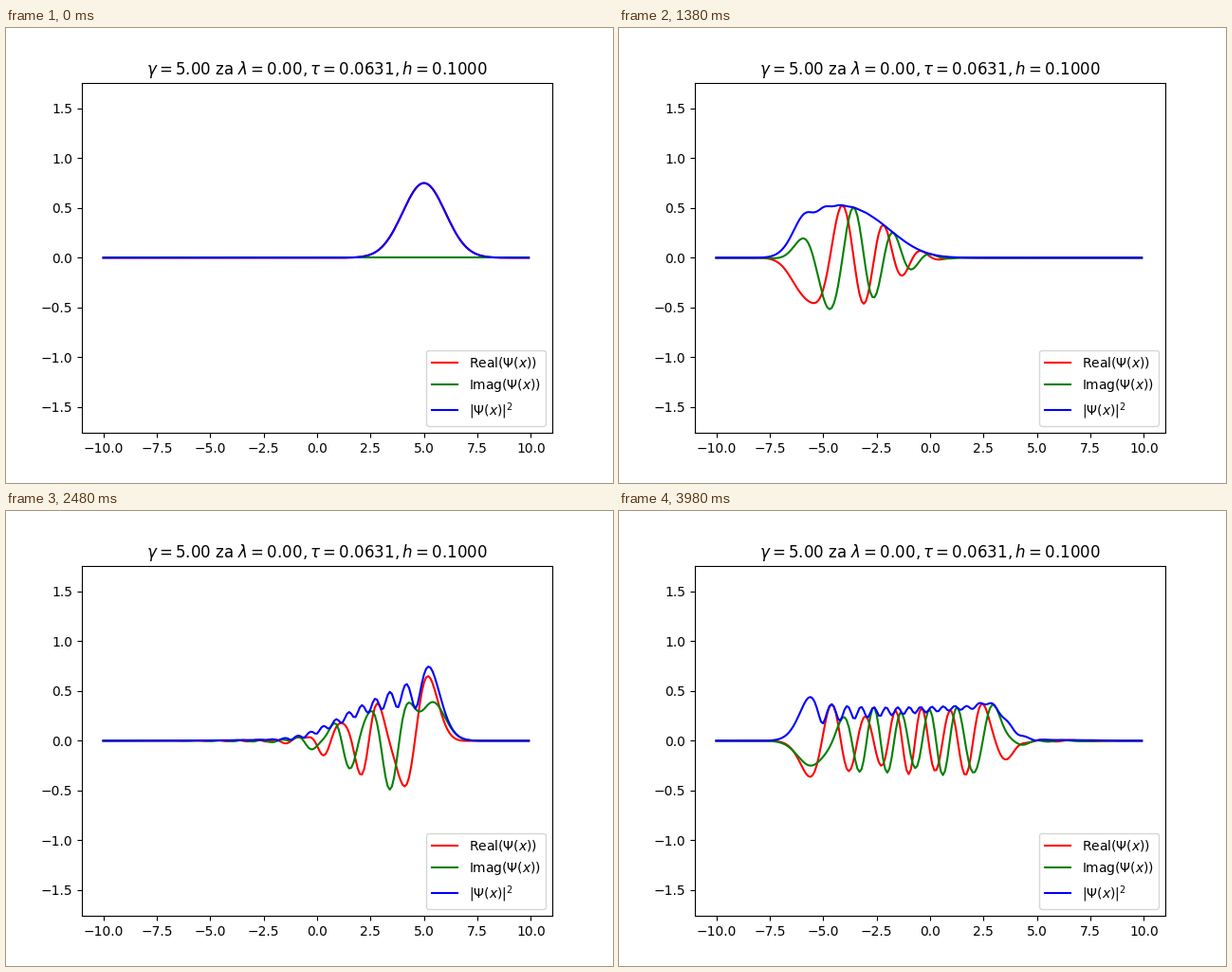
Animation of 640x480 px, one loop 4 s. Source, as a matplotlib script:

```python
import numpy as np
import matplotlib.pyplot as plt
from matplotlib.animation import FuncAnimation

STEPS = 200
GAMMA, LAM = 5.0, 0.0
h = 0.1
x = -10 + h * np.arange(200)
t, tau = np.linspace(0, 4 * np.pi, STEPS, retstep=True)


def hamiltonian():
    """Anharmonic oscillator with a spectral kinetic term."""
    n = len(x)
    k = 2 * np.pi * np.fft.fftfreq(n, h)
    kinetic = np.fft.ifft(k[:, None] ** 2 / 2 * np.fft.fft(np.eye(n), axis=0), axis=0)
    return kinetic.real + np.diag(x**2 / 2 + LAM * x**4)


def evolve():
    """Crank-Nicolson evolution of a displaced ground state."""
    a = 0.5j * tau * hamiltonian()
    one = np.eye(len(x))
    step = np.linalg.solve(one + a, one - a)
    psi = np.empty((STEPS, len(x)), complex)
    psi[0] = np.pi**-0.25 * np.exp(-((x - GAMMA) ** 2) / 2)
    for i in range(1, STEPS):
        psi[i] = step @ psi[i - 1]
    return psi


psi = evolve()

fig, ax = plt.subplots(figsize=(6.4, 4.8), dpi=100)
ax.set_xlim(-11, 11)
ax.set_ylim(-1.76, 1.76)
ax.set_title(
    rf"$\gamma = {GAMMA:.2f}$ za $\lambda = {LAM:.2f}, \tau = {tau:.4f}, h = {h:.4f}$"
)

parts = [
    ("red", r"Real($\Psi(x)$)", np.real),
    ("green", r"Imag($\Psi(x)$)", np.imag),
    ("blue", r"$|\Psi(x)|^2$", np.abs),
]
lines = [ax.plot(x, f(psi[0]), color=c, label=s)[0] for c, s, f in parts]
ax.legend(loc="lower right")


def update(i):
    for line, (_, _, f) in zip(lines, parts):
        line.set_ydata(f(psi[i]))
    return lines


anim = FuncAnimation(fig, update, frames=STEPS, interval=20, repeat=True, repeat_delay=0)
plt.show()
```
